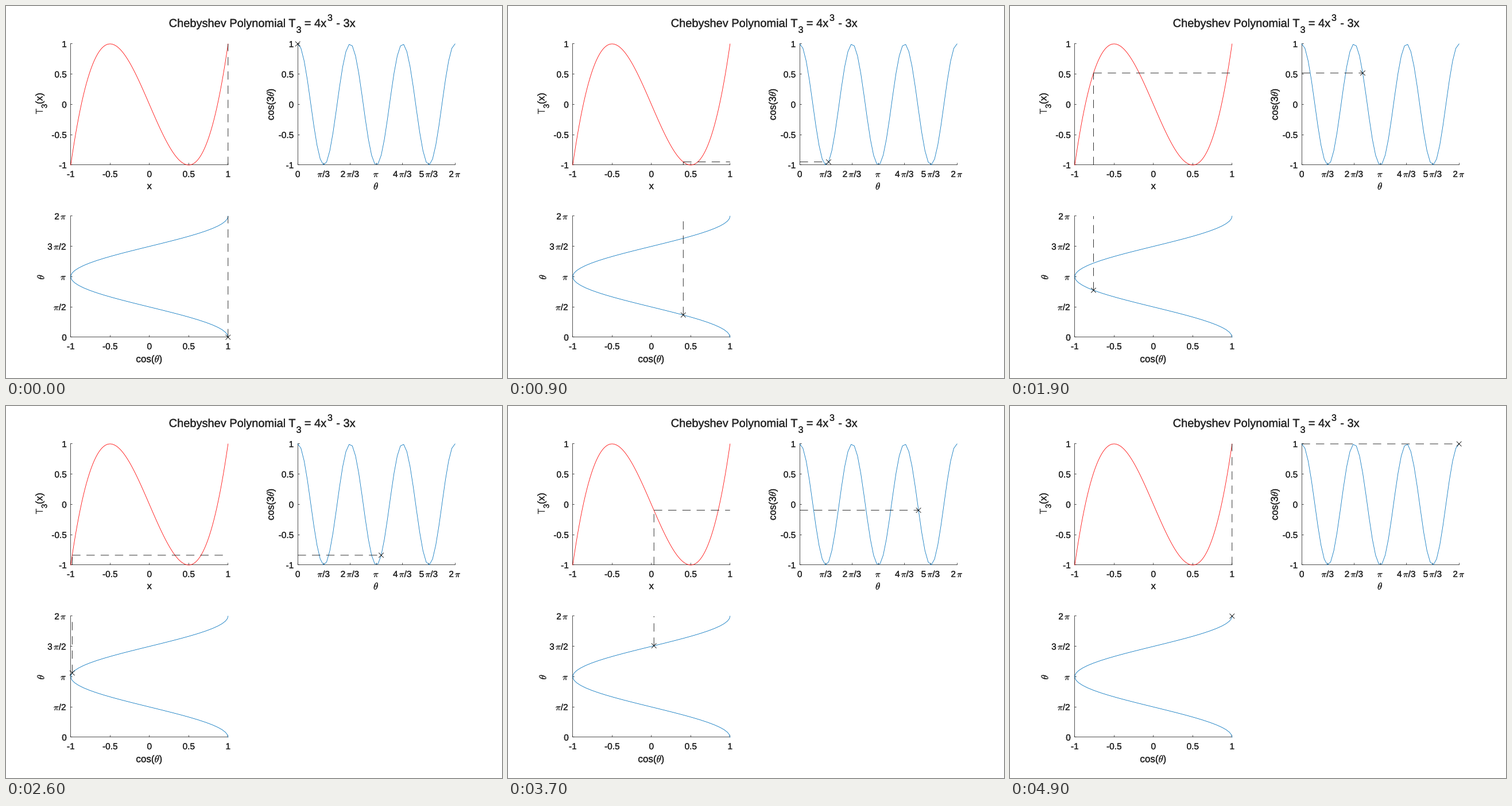
A matplotlib script that plays this animation: 864 by 648 pixels, repeating every 5000 ms.

```python
import numpy as np
import matplotlib.pyplot as plt
from matplotlib.animation import FuncAnimation
from matplotlib.patheffects import withStroke

W, H, DPI = 864, 648, 72   # at 72 dpi one point is one pixel
FRAMES, INTERVAL = 50, 100
INK, BLUE, RED = "#262626", "#0072BD", "#FF0000"
THIN = 0.8
TICK_SIZE, LABEL_SIZE, TITLE_SIZE = 15.4, 17, 20
TAU = 2 * np.pi

plt.rcParams.update({
    "font.family": "Liberation Sans",
    "mathtext.fontset": "cm",
    "text.hinting": "none",
    "lines.scale_dashes": False,
    "axes.unicode_minus": False,
})

fig = plt.figure(figsize=(W / DPI, H / DPI), dpi=DPI, facecolor="white")
stage = fig.add_axes([0, 0, 1, 1])
stage.set_xlim(0, W)
stage.set_ylim(H, 0)
stage.axis("off")


def write(x, y, text, size=LABEL_SIZE, ha="left", color=INK, rotation=0):
    # A hairline stroke gives the text its slightly heavier weight
    stage.text(x, y, text, size=size, ha=ha, va="baseline", color=color,
               rotation=rotation, rotation_mode="anchor",
               path_effects=[withStroke(linewidth=0.3, foreground=color)])


class Panel:
    """A plot area given by its pixel box and its data limits."""

    def __init__(self, left, right, top, bottom, xlim, ylim):
        self.left, self.right, self.top, self.bottom = left, right, top, bottom
        self.xlim, self.ylim = xlim, ylim

    def px(self, x):
        lo, hi = self.xlim
        return self.left + (np.asarray(x) - lo) / (hi - lo) * (self.right - self.left)

    def py(self, y):
        lo, hi = self.ylim
        return self.bottom - (np.asarray(y) - lo) / (hi - lo) * (self.bottom - self.top)

    def draw_axes(self, xticks, yticks, tick=2.8):
        def stroke(xs, ys):
            stage.plot(xs, ys, color=INK, lw=THIN, snap=False, zorder=1)

        spine_x = np.floor(self.left) + 0.5
        spine_y = np.ceil(self.bottom) - 0.5
        stroke([spine_x, spine_x], [self.top, spine_y])
        stroke([spine_x, self.right], [spine_y, spine_y])
        for value, label in xticks:
            x = self.px(value)
            column = np.floor(x) + 0.5
            stroke([column, column], [spine_y, spine_y - tick])
            write(x, self.bottom + 21, label, TICK_SIZE, "center")
        for value, label in yticks:
            y = self.py(value)
            row = np.ceil(y) - 0.5
            stroke([spine_x, spine_x + tick], [row, row])
            write(self.left - 7, y + 5.7, label, TICK_SIZE, "right")

    def curve(self, x, y, color):
        stage.plot(self.px(x), self.py(y), color=color, lw=THIN, zorder=2)

    def segment(self, line, x, y):
        line.set_data(self.px(x), self.py(y))

    def cross(self, line, x, y, r=4):
        cx, cy = self.px(x), self.py(y)
        line.set_data([cx - r, cx + r, np.nan, cx - r, cx + r],
                      [cy - r, cy + r, np.nan, cy + r, cy - r])


poly = Panel(112.8, 386.8, 66, 277, (-1, 1), (-1, 1))
wave = Panel(508.2, 782.2, 66, 277, (0, TAU), (-1, 1))
turn = Panel(112.8, 386.8, 366, 577, (-1, 1), (0, TAU))

unit_ticks = [(v, f"{v:g}") for v in (-1, -0.5, 0, 0.5, 1)]
third_labels = ["0", r"$\pi$/3", r"2$\,\pi$/3", r"$\pi$", r"4$\,\pi$/3",
                r"5$\,\pi$/3", r"2$\,\pi$"]
half_labels = ["0", r"$\pi$/2", r"$\pi$", r"3$\,\pi$/2", r"2$\,\pi$"]
third_ticks = [(k * np.pi / 3, s) for k, s in enumerate(third_labels)]
half_ticks = [(k * np.pi / 2, s) for k, s in enumerate(half_labels)]

poly.draw_axes(unit_ticks, unit_ticks)
wave.draw_axes(third_ticks, unit_ticks)
turn.draw_axes(unit_ticks, half_ticks)

theta = np.linspace(0, TAU, FRAMES)
xs = np.linspace(-1, 1, 101)
poly.curve(xs, 4 * xs**3 - 3 * xs, RED)
wave.curve(theta, np.cos(3 * theta), BLUE)
turn.curve(np.cos(theta), theta, BLUE)

# Title with lowered and raised digits
write(283.7, 36.5, "Chebyshev Polynomial T", TITLE_SIZE)
write(505.6, 46.7, "3", TITLE_SIZE * 0.8)
write(519.8, 36.5, "= 4x", TITLE_SIZE)
write(560, 25.8, "3", TITLE_SIZE * 0.8)
write(575.3, 36.5, "- 3x", TITLE_SIZE)

# Axis labels
write(249.8, 319, "x", ha="center")
write(645, 319.7, r"$\theta$", ha="center")
write(249.8, 620.5, r"cos($\theta$)", ha="center")
write(63.5, 188.6, "T", rotation=90)
write(71.3, 178.2, "3", LABEL_SIZE * 0.8, rotation=90)
write(63.5, 171, "(x)", rotation=90)
write(466.5, 171, r"cos(3$\theta$)", ha="center", rotation=90)
write(66.3, 471.7, r"$\theta$", ha="center", rotation=90)


def moving_line(**style):
    return stage.plot([], [], color="black", lw=THIN, snap=False, zorder=3, **style)[0]


dashes = dict(ls=(0, (14.4, 10.4)), dash_capstyle="butt")
turn_up, poly_up, poly_across, wave_across = (moving_line(**dashes) for _ in range(4))
turn_mark, wave_mark = moving_line(), moving_line()


def update(frame):
    angle = theta[frame]
    x, value = np.cos(angle), np.cos(3 * angle)
    turn.segment(turn_up, [x, x], [angle, TAU])
    poly.segment(poly_up, [x, x], [-1, value])
    poly.segment(poly_across, [x, 1], [value, value])
    wave.segment(wave_across, [0, angle], [value, value])
    turn.cross(turn_mark, x, angle)
    wave.cross(wave_mark, angle, value)
    return turn_up, poly_up, poly_across, wave_across, turn_mark, wave_mark


anim = FuncAnimation(fig, update, frames=FRAMES, interval=INTERVAL,
                     repeat=True, repeat_delay=0)
plt.show()
```
